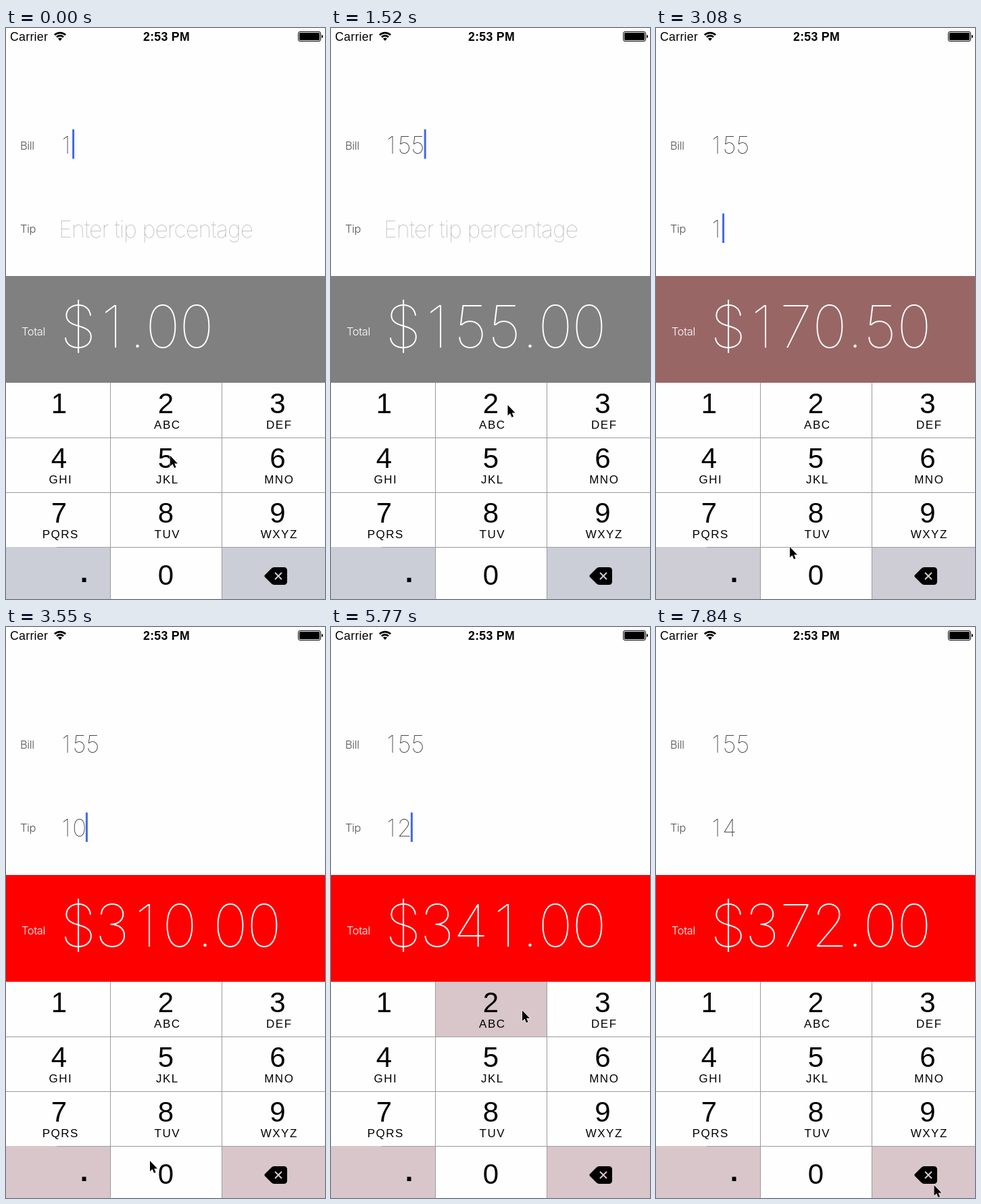
These frames come from a looping animation (472 by 845 pixels, 8 s). An HTML page:

```html
<!DOCTYPE html>
<html lang="en">
<head>
<meta charset="utf-8">
<title>Tip calculator</title>
<style>
  html, body { margin: 0; width: 100%; height: 100%; overflow: hidden; background: #fefefe; }
  svg { display: block; width: 472px; height: 845px; font-family: "Liberation Sans", Arial, sans-serif; }
  .thin { font-family: Inter, Roboto, sans-serif; font-weight: 100; }
  .label { font: 300 16.5px Inter, Roboto, sans-serif; letter-spacing: -.4px; fill: #555; }
  .field { font-size: 35.3px; fill: #222; }
  .mid { text-anchor: middle; }
  .status { font-size: 17.7px; letter-spacing: .3px; }
  .digit { font-size: 42px; }
  .letters { font-size: 17px; letter-spacing: 1.5px; }
</style>
</head>
<body>
<svg viewBox="0 0 472 845">
  <rect width="472" height="845" fill="#fefefe"/>

  <text class="status" x="6" y="19">Carrier</text>
  <g fill="none" stroke="#000" stroke-width="2.7">
    <path d="M71.9 10.4a11.5 11.5 0 0 1 16.2 0M75 13.5a7.1 7.1 0 0 1 10 0"/>
    <path d="M80 19l-3-3.2a4.2 4.2 0 0 1 6 0z" fill="#000" stroke="none"/>
  </g>
  <text class="status mid" x="237.5" y="19" font-weight="700">2:53 PM</text>
  <rect x="432.5" y="5.5" width="33" height="14" rx="2.5" fill="none" stroke="#000"/>
  <rect x="434" y="7" width="30" height="11" rx="1.2"/>
  <path d="M467 10q2 .4 2 2.5t-2 2.5z"/>

  <text class="label" x="21" y="180">Bill</text>
  <text class="label" x="21" y="303">Tip</text>
  <text id="bill" class="thin field mid" y="186"/>
  <text id="tip" class="thin field mid" y="310"/>
  <text id="hint" class="thin" x="78" y="310" font-size="34" letter-spacing="-.9" fill="#b4b4b4">Enter tip percentage</text>
  <rect id="caret" width="3" height="43.5" fill="#4169eb"/>

  <rect id="panel" y="367" width="472" height="158"/>
  <text class="label" x="23" y="455" style="fill:#fff">Total</text>
  <text id="total" class="thin mid" y="473" font-size="87" fill="#fff"/>

  <g id="keys"></g>
  <path d="M0 606.5H472M0 687.5H472M75 768.5H472M154.5 525V845M319.5 525V845" fill="none" stroke="#9c9c9e"/>
  <g id="captions"></g>
  <text class="mid" x="115.5" y="820" font-size="42" font-weight="700">.</text>
  <path d="M383 809.5L392.5 800Q394.500 798 397 798H411Q416 798 416 803V819Q416 824 411 824H397Q394.500 824 392.500 822L383 812.500Q381.500 811 383 809.500Z"/>
  <path id="cross" d="M398 806l10 10m0-10l-10 10" fill="none" stroke-width="2"/>

  <path id="mouse" d="M0 0V15.500L3.600 12.300 6 18 8.600 16.900 6.200 11.400H11Z" stroke="#fff" stroke-width="1.200" paint-order="stroke"/>
</svg>
<script>
const LOOP = 8000;
const $ = id => document.getElementById(id);
const columns = [[0, 154, 78.5], [154, 166, 236.5], [320, 152, 402]];
const rows = [525, 606, 687, 768];
const letters = ["", "ABC", "DEF", "GHI", "JKL", "MNO", "PQRS", "TUV", "WXYZ"];
const keyNames = [..."123456789.0", "del"];

// key, pressed, takes effect, released
const presses = [
  ["5", 60, 390, 450], ["5", 930, 1110, 1170],
  ["1", 2680, 2820, 2890], ["0", 3250, 3330, 3430],
  ["del", 4770, 4890, 4950], ["2", 5590, 5710, 5830],
  ["del", 6450, 6570, 6630], ["4", 6950, 7040, 7150]
];
const FOCUS_TIP = 2100;

const mousePath = [
  [0, 243, 633], [1380, 243, 633], [1510, 261.5, 558], [2380, 261.5, 558],
  [2650, 92, 560], [2860, 92, 560], [3080, 198, 768], [3190, 213, 790],
  [4360, 213, 790], [4620, 426, 820], [4990, 426, 820], [5530, 283, 567.5],
  [5900, 283, 567.5], [6440, 400, 812], [6650, 400, 812], [6920, 132.5, 661],
  [7230, 132.5, 661], [7840, 411.5, 826]
];

const clamp = v => Math.min(1, Math.max(0, v));
const mix = (a, b, k) => a + (b - a) * k;
const ease = k => k * k * (3 - 2 * k);
const blend = (a, b, k) => `rgb(${a.map((v, i) => Math.round(mix(v, b[i], k)))})`;

function add(parent, tag, attrs, text = "") {
  const node = document.createElementNS("http://www.w3.org/2000/svg", tag);
  for (const name in attrs) node.setAttribute(name, attrs[name]);
  node.textContent = text;
  return parent.appendChild(node);
}

const keyRects = keyNames.map((name, i) => {
  const [x, width, center] = columns[i % 3];
  const y = rows[Math.floor(i / 3)];
  if (name >= "0" && name <= "9")
    add($("captions"), "text", { class: "digit mid", x: center, y: y + (name === "0" ? 56 : 45) }, name);
  if (letters[i])
    add($("captions"), "text", { class: "letters mid", x: center + 2.3, y: y + 68 }, letters[i]);
  return add($("keys"), "rect", { x, y, width, height: 81 });
});

// Sets figures in equal cells, with a half cell for the point.
function setFigures(node, text, x, cell) {
  const centers = [...text].map(c => {
    const width = c === "." ? cell / 2 : cell;
    x += width;
    return x - width / 2;
  });
  node.setAttribute("x", centers.join(" "));
  node.textContent = text;
}

function mouseAt(t) {
  const i = mousePath.findIndex(p => p[0] > t);
  if (i < 0) return mousePath[mousePath.length - 1].slice(1);
  const [a, b] = [mousePath[i - 1], mousePath[i]];
  const k = ease((t - a[0]) / (b[0] - a[0]));
  return [mix(a[1], b[1], k), mix(a[2], b[2], k)];
}

function caretOpacity(age) {
  if (age < 700) return 1;
  const phase = (age - 700) % 1000;
  return phase < 370 ? 1 - clamp(phase / 100) : clamp((phase - 370) / 110);
}

function draw(t) {
  const fields = { bill: "1", tip: "" };
  const active = t < FOCUS_TIP ? "bill" : "tip";
  let touched = t < FOCUS_TIP ? 0 : FOCUS_TIP;
  let held = null;
  for (const [key, down, effect, up] of presses) {
    if (t >= effect) {
      const name = effect < FOCUS_TIP ? "bill" : "tip";
      fields[name] = key === "del" ? fields[name].slice(0, -1) : fields[name] + key;
      touched = Math.max(touched, effect);
    }
    if (t >= down && t < up) held = key;
  }

  const { bill, tip } = fields;
  setFigures($("bill"), bill, 79, 19.8);
  setFigures($("tip"), tip, 79, 19.8);
  setFigures($("total"), "$" + (bill * (1 + tip / 10)).toFixed(2), 82, 50);
  $("hint").setAttribute("visibility", tip ? "hidden" : "visible");

  const caret = $("caret");
  caret.setAttribute("x", 78.3 + 19.8 * fields[active].length);
  caret.setAttribute("y", active === "bill" ? 150 : 274.5);
  caret.setAttribute("opacity", caretOpacity(t - touched));

  const red = .2 * ease(clamp((t - 2820) / 250)) + .8 * ease(clamp((t - 3330) / 220));
  const tint = blend([203, 206, 214], [216, 198, 203], red);
  $("panel").setAttribute("fill", blend([128, 128, 128], [255, 0, 0], red));
  keyRects.forEach((rect, i) => {
    const special = i === 9 || i === 11;
    const shaded = special !== (held === keyNames[i]);
    rect.setAttribute("fill", shaded ? tint : "#fefefe");
  });
  $("cross").setAttribute("stroke", held === "del" ? "#fefefe" : tint);
  $("mouse").setAttribute("transform", `translate(${mouseAt(t)})`);
}

const start = performance.now();
function tick() {
  draw((performance.now() - start) % LOOP);
  requestAnimationFrame(tick);
}
tick();
</script>
</body>
</html>
```
